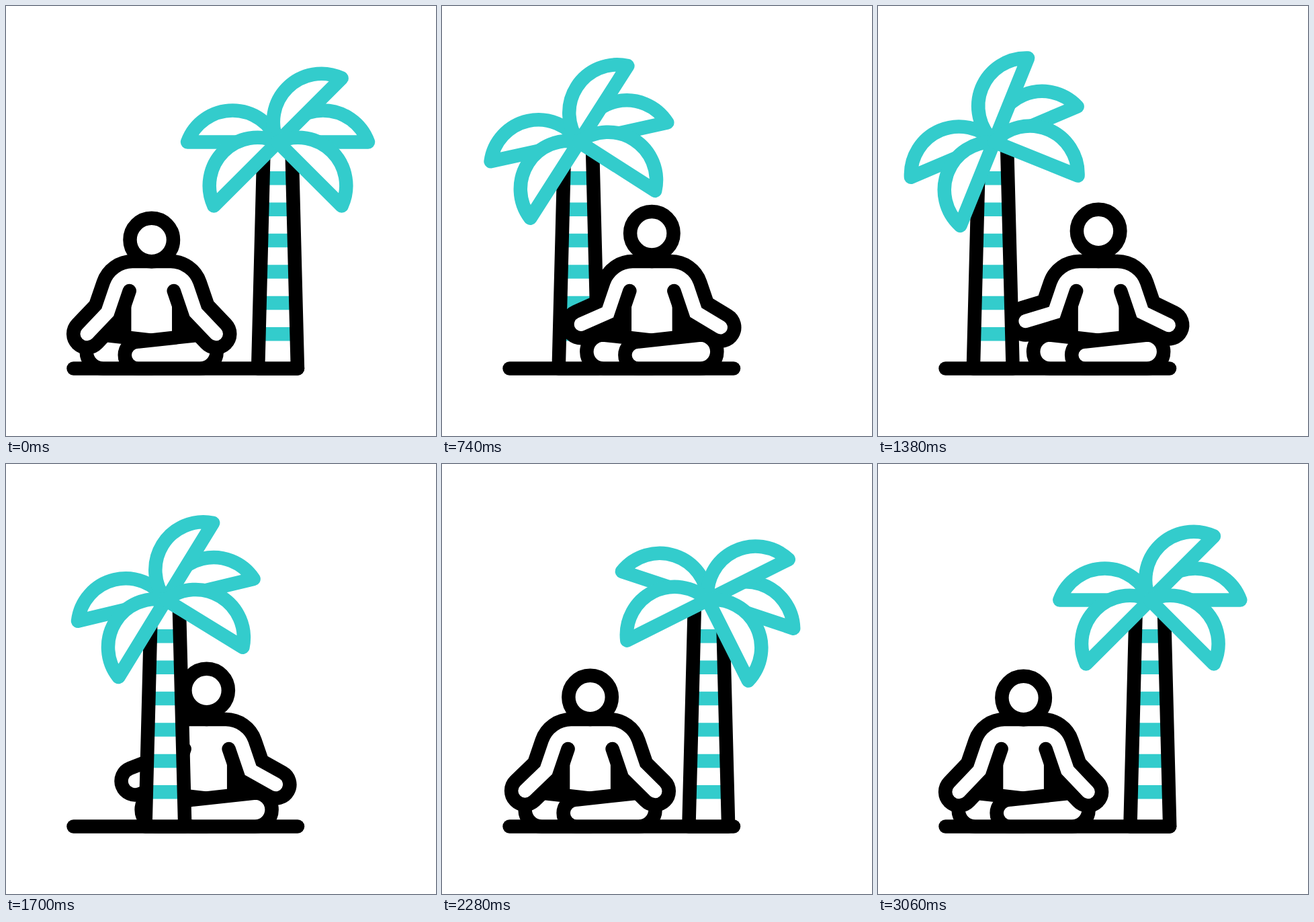
Recreate the animation shown at these times as an HTML page. Size 640 px wide and 640 px high, loop 3.6 s.

```html
<!DOCTYPE html>
<html lang="en">
<head>
<meta charset="utf-8">
<title>Meditation under a palm</title>
<style>
  html, body { margin: 0; width: 100%; height: 100%; overflow: hidden; background: #fff; }
  svg { display: block; width: 100vw; height: 100vh; }
  .line { fill: #fff; stroke: #000; stroke-width: 20.5; stroke-linejoin: round; stroke-linecap: round; }
  .arm { stroke-linejoin: miter; }
  .teal { stroke: #33cccc; }
</style>
</head>
<body>
<svg viewBox="0 0 640 640">
  <defs>
    <path id="leaf" class="line teal" d="M0 0H134.5A71.6 71.6 0 0 0 0 0Z"/>
    <path id="side" d="M-33 424L-30.3 446V492H-72V489L-47 466Z"/>
  </defs>
  <path class="line" d="M100.5 539.5H434"/>
  <g id="scene">
    <g id="palm">
      <path fill="#fff" d="M-29.6 539.5L-21 205H21L29.6 539.5Z"/>
      <g id="stripes"></g>
      <path class="line" fill-opacity="0" d="M-21 215L-29.4 539.5H29.4L21 215"/>
      <g id="crown">
        <use href="#leaf" transform="scale(-1 1)"/>
        <use href="#leaf"/>
        <use href="#leaf" transform="rotate(-45)"/>
        <use href="#leaf" transform="scale(-1 1) rotate(45)"/>
        <use href="#leaf" transform="rotate(45)"/>
      </g>
    </g>
    <g id="person">
      <path fill="#fff" d="M-42 382H42V492H-42Z"/>
      <path class="line" d="M0 497.6L-72 489.5a25 25 0 0 0 0 50H0"/>
      <path class="line" d="M72 539.5a25 25 0 0 0 0 -50L-20 499.6a20 20 0 0 0 0 40Z"/>
      <use href="#side"/>
      <use href="#side" transform="scale(-1 1)"/>
      <path id="leftArm" class="line arm"/>
      <path id="rightArm" class="line arm" transform="scale(-1 1)"/>
      <circle id="head" class="line" cy="348" r="32.25"/>
    </g>
  </g>
</svg>
<script>
const LOOP = 3600, SWAP = 1140;
const $ = id => document.getElementById(id);
const scene = $('scene'), palm = $('palm'), person = $('person');

// Smooth step from 0 to 1 between two times.
function ease(t, from, to) {
  const u = Math.min(1, Math.max(0, (t - from) / (to - from)));
  return u * u * (3 - 2 * u);
}

const mix = (a, b, k) => a + (b - a) * k;

// Arm outline around a shoulder-elbow-hand axis; (dx, dy) leads from the fixed elbow to the hand.
function armPath(dx, dy) {
  const R = 20.5, ex = -65.5, ey = 456;
  const length = Math.hypot(dx, dy);
  const ux = -.946, uy = -.324;
  const nx = -dy / length, ny = dx / length;
  const k = R / (1 + ux * nx + uy * ny);
  const mx = (ux + nx) * k, my = (uy + ny) * k;
  const hx = ex + dx, hy = ey + dy;
  return `M0 380H-28.4A46 46 0 0 0 -71.8 411L${ex + mx} ${ey + my}`
    + `L${hx + nx * R} ${hy + ny * R}A${R} ${R} 0 0 0 ${hx - nx * R} ${hy - ny * R}`
    + `L${ex - mx} ${ey - my}L-33 424`;
}

function draw(t) {
  const out = ease(t, -20, 980);
  const palmX = 404.8 - 236 * (out - ease(t, 1315, 2400));
  const personX = 216.6 + 112 * (out - ease(t, 1340, 2400));
  const lift = ease(t, 104, 1047) - ease(t, 1448, 2456);
  const sway = -23 * ease(t, 177, 1247) + 41.5 * ease(t, 1425, 2310) - 18.5 * ease(t, 2310, 3040);

  palm.setAttribute('transform', `translate(${palmX} 0)`);
  $('crown').setAttribute('transform', `translate(0 198.5) rotate(${sway}) translate(0 4)`);
  person.setAttribute('transform', `translate(${personX} 0)`);
  $('head').setAttribute('cy', 348 - 13 * lift);
  $('leftArm').setAttribute('d', armPath(mix(-30.5, -43, lift), mix(32, 13, lift)));
  $('rightArm').setAttribute('d', armPath(mix(-30.5, -39, lift), mix(32, 19, lift)));

  const front = t < SWAP ? person : palm;
  if (scene.lastElementChild !== front) scene.appendChild(front);
}

for (let i = 0; i < 6; i++) {
  const stripe = document.createElementNS('http://www.w3.org/2000/svg', 'path');
  const half = 18 + i;
  stripe.setAttribute('d', `M${-half} ${256.3 + 46.4 * i}H${half}`);
  stripe.setAttribute('class', 'teal');
  stripe.setAttribute('stroke-width', 20.5);
  $('stripes').appendChild(stripe);
}

let start;
function tick(now) {
  start ??= now;
  draw((now - start) % LOOP);
  requestAnimationFrame(tick);
}
draw(0);
requestAnimationFrame(tick);
</script>
</body>
</html>
```
